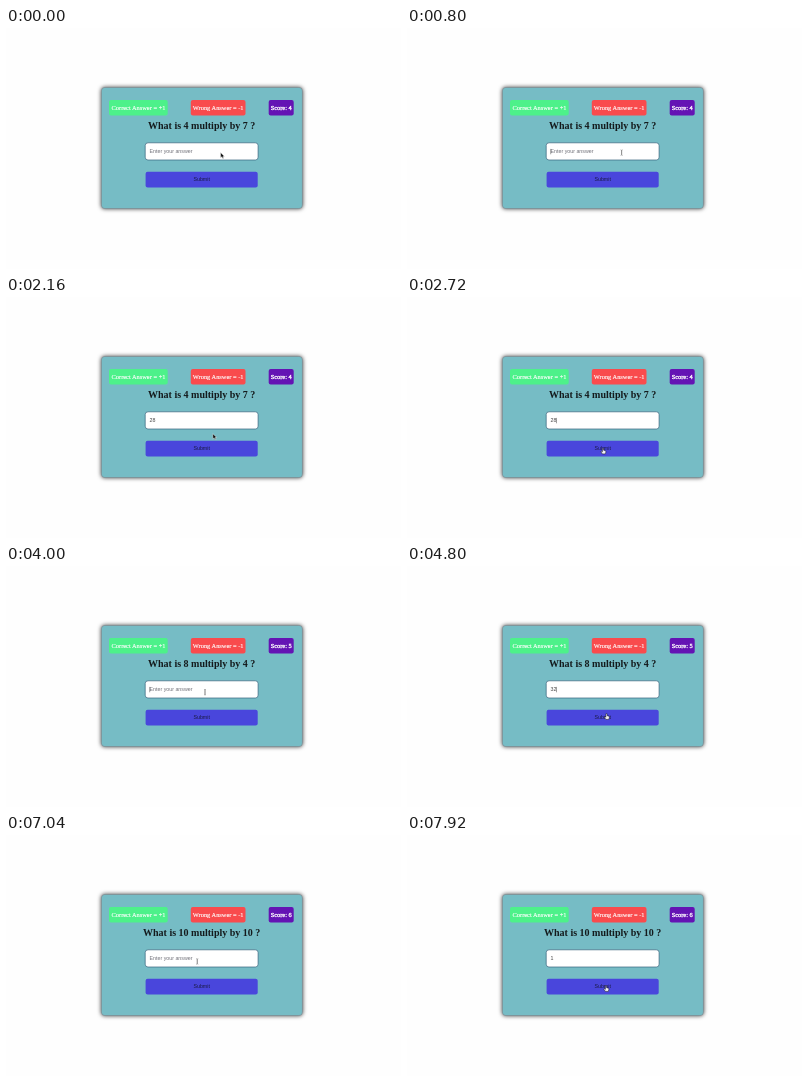
Recreate the animation shown at these times as an HTML page. Size 395x241 px, loop 8 s.

```html
<!DOCTYPE html>
<html lang="en">
<head>
<meta charset="utf-8">
<title>Multiplication quiz</title>
<style>
  html, body { margin: 0; width: 100%; height: 100%; overflow: hidden; background: #fefefe; }
  svg { display: block; width: 100vw; height: 100vh; }
  .card { fill: #76bcc5; stroke: #7d7f86; stroke-width: .5; filter: drop-shadow(0 .2px 2px rgba(0, 0, 0, .8)); }
  .badge { font: 6.4px "Liberation Serif", serif; fill: #fff; stroke: #fff; stroke-width: .15; text-anchor: middle; }
  .badge rect { stroke: none; }
  .question { font: bold 10px "Liberation Serif", serif; fill: #141a1c; text-anchor: middle; }
  .small { font: 5.3px "Liberation Sans", sans-serif; }
  .field { fill: #fff; stroke: #35627b; stroke-width: .7; }
</style>
</head>
<body>
<svg viewBox="0 0 395 241" preserveAspectRatio="none">
  <rect class="card" x="95.4" y="59.4" width="201" height="121.2" rx="3.5"/>
  <g class="badge">
    <rect x="103" y="72" width="58.7" height="15.6" rx="2" fill="#4df18a"/>
    <text x="132.5" y="82.1">Correct Answer = +1</text>
    <rect x="184.8" y="72" width="54.7" height="15.6" rx="2" fill="#f94b4d"/>
    <text x="212.2" y="82.1">Wrong Answer = -1</text>
    <rect x="262.7" y="72" width="25" height="15.6" rx="2" fill="#6413b4"/>
    <text id="score" x="275.2" y="82.1" stroke-width=".3"></text>
  </g>
  <text id="question" class="question" x="195.7" y="101.2"></text>
  <rect class="field" x="139.2" y="114.8" width="112.9" height="17.2" rx="2.8"/>
  <text id="entry" class="small" x="143.5" y="125.4"></text>
  <rect id="caret" y="120.9" width=".5" height="5.4" fill="#444"/>
  <rect x="139.6" y="143.7" width="112.1" height="15.8" rx="2" fill="#4946dc"/>
  <text class="small" x="195.7" y="153.4" text-anchor="middle" fill="#1b1b46">Submit</text>
  <g id="pointer">
    <path id="arrow" d="M0 0V5.2L1.3 4.1L2.2 6L3.1 5.6L2.3 3.8H3.9Z" fill="#111" stroke="#fff" stroke-width=".4"/>
    <path id="beam" d="M-1-2.8Q0-2.8 0-2V2Q0 2.8-1 2.8M1-2.8Q0-2.8 0-2V2Q0 2.8 1 2.8" fill="none" stroke="#666" stroke-width=".5"/>
    <path id="hand" transform="scale(.85)" d="M-.7-2.5Q0-3.4.7-2.5V-.4L2.9.2Q3.6.6 3.3 2L2.7 4H-.7L-2.5 1.5Q-2.4.6-1.5.9L-.7 1.6Z" fill="#f2f2f8" stroke="#111" stroke-width=".6"/>
  </g>
</svg>
<script>
const LOOP = 8000, MOVE = 720, KEY_GAP = 200, BLINK = 500, FIRST_SCORE = 4;
const $ = id => document.getElementById(id);

// The pointer reaches the field at focus and heads for the button at leave.
const rounds = [
  { start: 0, a: 4, b: 7, keys: "28", focus: 640, type: 1440, leave: 1840,
    field: { x: 214.6, y: 124.6 }, button: { x: 196, y: 153.5 } },
  { start: 3040, a: 8, b: 4, keys: "32", focus: 3760, type: 4240, leave: 4080,
    field: { x: 199, y: 126.2 }, button: { x: 199.5, y: 150 } },
  { start: 5200, a: 10, b: 10, keys: "1", focus: 6360, type: 7400, leave: 6960,
    field: { x: 191, y: 125.5 }, button: { x: 199, y: 153 } }
];

const clamp = (v, low, high) => Math.min(high, Math.max(low, v));

function glide(from, to, t, start) {
  const p = clamp((t - start) / MOVE, 0, 1), ease = p * p * (3 - 2 * p);
  return { x: from.x + (to.x - from.x) * ease, y: from.y + (to.y - from.y) * ease };
}

function setText(id, value) {
  if ($(id).textContent !== value) $(id).textContent = value;
}

function drawForm(round, index, t) {
  const count = clamp(Math.floor((t - round.type) / KEY_GAP) + 1, 0, round.keys.length);
  const lastEvent = count ? round.type + (count - 1) * KEY_GAP : round.focus;
  const caretOn = t >= round.focus && (t - lastEvent) % (2 * BLINK) < BLINK;

  setText("question", `What is ${round.a} multiply by ${round.b} ?`);
  setText("score", `Score: ${FIRST_SCORE + index}`);
  setText("entry", round.keys.slice(0, count) || "Enter your answer");
  $("entry").setAttribute("fill", count ? "#444" : "#707078");
  $("caret").setAttribute("x", 143.6 + count * 2.95);
  $("caret").style.opacity = caretOn ? 1 : 0;
}

function drawPointer(round, previous, t) {
  const { x, y } = t < round.leave
    ? glide(previous ? previous.button : round.field, round.field, t, round.focus - MOVE)
    : glide(round.field, round.button, t, round.leave);
  const overButton = y > 143 && y < 160;
  const overField = t >= round.focus && y < 132;
  const shape = overButton ? "hand" : overField ? "beam" : "arrow";

  $("pointer").setAttribute("transform", `translate(${x} ${y})`);
  for (const id of ["arrow", "beam", "hand"]) $(id).style.display = id === shape ? "" : "none";
}

function draw() {
  const t = performance.now() % LOOP;
  const index = rounds.findLastIndex(round => round.start <= t);
  drawForm(rounds[index], index, t);
  drawPointer(rounds[index], rounds[index - 1], t);
  requestAnimationFrame(draw);
}
draw();
</script>
</body>
</html>
```
